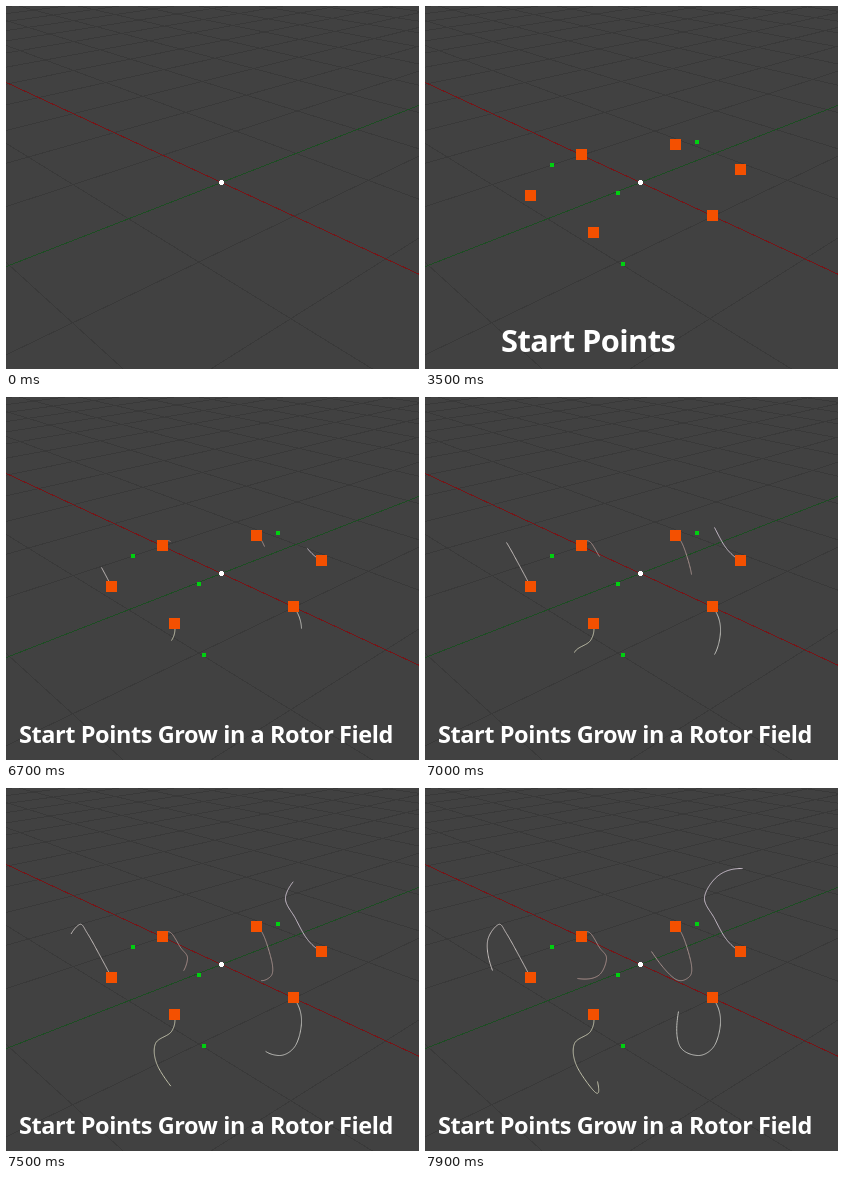
These frames come from a looping animation (413 px wide and 363 px high, 8000 ms). An HTML page:

```html
<!DOCTYPE html>
<html lang="en">
<head>
<meta charset="utf-8">
<title>Rotor field growth</title>
<style>
  html, body { margin: 0; width: 100%; height: 100%; overflow: hidden; background: #414141; }
  svg { display: block; width: 100%; height: 100%; }
  text {
    fill: #fff;
    font-family: "Open Sans", "Noto Sans", sans-serif;
    font-weight: 700;
    letter-spacing: -0.018em;
  }
  .crisp { shape-rendering: crispEdges; }
</style>
</head>
<body>
<svg id="stage" viewBox="0 0 413 363"></svg>
<script>
const LOOP = 8000, STEP = 100;
const SHOW_ATTRACTORS = 500, SHOW_STARTS = 3500, GROW = 6500;
const EXTENT = 16;        // floor size in grid cells
const KNOT_GAP = 3;       // growth steps between strand knots
const stage = document.getElementById('stage');

function add(parent, tag, attrs) {
  const el = document.createElementNS('http://www.w3.org/2000/svg', tag);
  for (const key in attrs) el.setAttribute(key, attrs[key]);
  return parent.appendChild(el);
}

// Perspective view of the floor: u runs along the red axis, v along the green one.
const depth = (u, v) => 1 - 0.105 * u - 0.11 * v;
function project(u, v) {
  const w = depth(u, v);
  return [(215.3 + 42.3 * u - 106.4 * v) / w, (175.9 + 11.68 * u + 12.95 * v) / w];
}

function floorLine(parent, along, offset, stroke) {
  const at = s => along === 'u' ? [s, offset] : [offset, s];
  let end = EXTENT;
  while (depth(...at(end)) < 0.15) end -= 0.25;
  if (end <= -EXTENT) return;
  const [x1, y1] = project(...at(-EXTENT));
  const [x2, y2] = project(...at(end));
  add(parent, 'line', { x1, y1, x2, y2, stroke });
}

function square(parent, [x, y], size, fill) {
  const half = Math.floor(size / 2);
  add(parent, 'rect', { x: x - half, y: y - half, width: size, height: size, fill });
}

// Start points form a hexagon on the floor, centred on the origin.
function startPoint(k) {
  const angle = k * Math.PI / 3;
  return project(Math.cos(angle), 1.013 * Math.sin(angle)).map(Math.floor);
}

const attractors = [[127, 159], [272, 136], [193, 187], [198, 258]];

// One strand per start point: its colour and a few evenly timed points on its way.
const strands = [
  ['#bfbfba', [295, 231], [289, 257], [273, 267], [254, 257], [253, 223]],
  ['#c2c2ab', [165, 243], [149, 255], [151, 277], [170, 304], [172, 293]],
  ['#c6bfbd', [95, 170], [81, 145], [73, 136], [62, 153], [67, 182]],
  ['#a98e8a', [164, 144], [174, 159], [181, 170], [173, 187], [152, 190]],
  ['#a5908c', [258, 149], [266, 177], [263, 189], [249, 190], [226, 163]],
  ['#cbbfcd', [301, 151], [289, 130], [279, 109], [293, 87], [317, 80]]
].map(([color, ...way], k) => ({ color, knots: withEnds([startPoint(k), ...way]) }));

// Continues the bend one knot past each end.
function withEnds(knots) {
  const beyond = (a, b, c) => a.map((_, i) => 3 * a[i] - 3 * b[i] + c[i]);
  const [z, y, x] = knots.slice().reverse();
  return [beyond(...knots.slice(0, 3)), ...knots, beyond(z, y, x)];
}

function spline(a, b, c, d, t) {
  return b + t / 2 * (c - a + t * (2 * a - 5 * b + 4 * c - d + t * (3 * (b - c) + d - a)));
}

function strandAt(knots, s) {
  const i = Math.min(Math.floor(s), knots.length - 4);
  const [a, b, c, d] = knots.slice(i, i + 4);
  return [0, 1].map(axis => (spline(a[axis], b[axis], c[axis], d[axis], s - i) + 0.5).toFixed(2));
}

function strandPath(knots, step) {
  const points = [];
  const count = 8 * (step + 1);
  for (let n = 0; n <= count; n++) points.push(strandAt(knots, n / 8 / KNOT_GAP).join(' '));
  return 'M' + points.join('L');
}

// Scene, back to front
add(stage, 'rect', { width: 413, height: 363, fill: '#414141' });
const floor = add(stage, 'g', { class: 'crisp', transform: 'translate(0.2 0.6)' });
for (let k = -EXTENT; k <= EXTENT; k++) {
  if (!k) continue;
  floorLine(floor, 'u', k, '#393939');
  floorLine(floor, 'v', k, '#393939');
}
floorLine(floor, 'v', 0, '#1d4d23');
floorLine(floor, 'u', 0, '#771417');

const strandLayer = add(stage, 'g', { fill: 'none', 'stroke-linejoin': 'round' });
for (const s of strands) s.el = add(strandLayer, 'path', { stroke: s.color });

const attractorLayer = add(stage, 'g', { class: 'crisp' });
for (const p of attractors) square(attractorLayer, p, 4, '#00d010');

const startLayer = add(stage, 'g', { class: 'crisp' });
strands.forEach((_, k) => square(startLayer, startPoint(k), 11, '#f45000'));

add(stage, 'circle', { cx: 215.5, cy: 176.5, r: 2.4, fill: '#fff', class: 'crisp' });
const caption = add(stage, 'text', { y: 345.8 });

function setCaption(words, x, size) {
  if (caption.textContent === words) return;
  caption.textContent = words;
  caption.setAttribute('x', x);
  caption.setAttribute('font-size', size);
}

const show = (el, on) => el.setAttribute('visibility', on ? 'visible' : 'hidden');

function render(time) {
  const growing = time >= GROW;
  show(attractorLayer, time >= SHOW_ATTRACTORS);
  show(startLayer, time >= SHOW_STARTS);
  show(strandLayer, growing);

  if (growing) setCaption('Start Points Grow in a Rotor Field', 13, 23.5);
  else if (time >= SHOW_STARTS) setCaption('Start Points', 76, 30.8);
  else if (time >= SHOW_ATTRACTORS) setCaption('Attractor Points', 76.5, 30.8);
  else setCaption('', 0, 30.8);

  if (growing) {
    const step = Math.floor((time - GROW) / STEP);
    for (const s of strands) s.el.setAttribute('d', strandPath(s.knots, step));
  }
}

const began = performance.now();
function tick() {
  render((performance.now() - began) % LOOP);
  requestAnimationFrame(tick);
}
tick();
</script>
</body>
</html>
```
